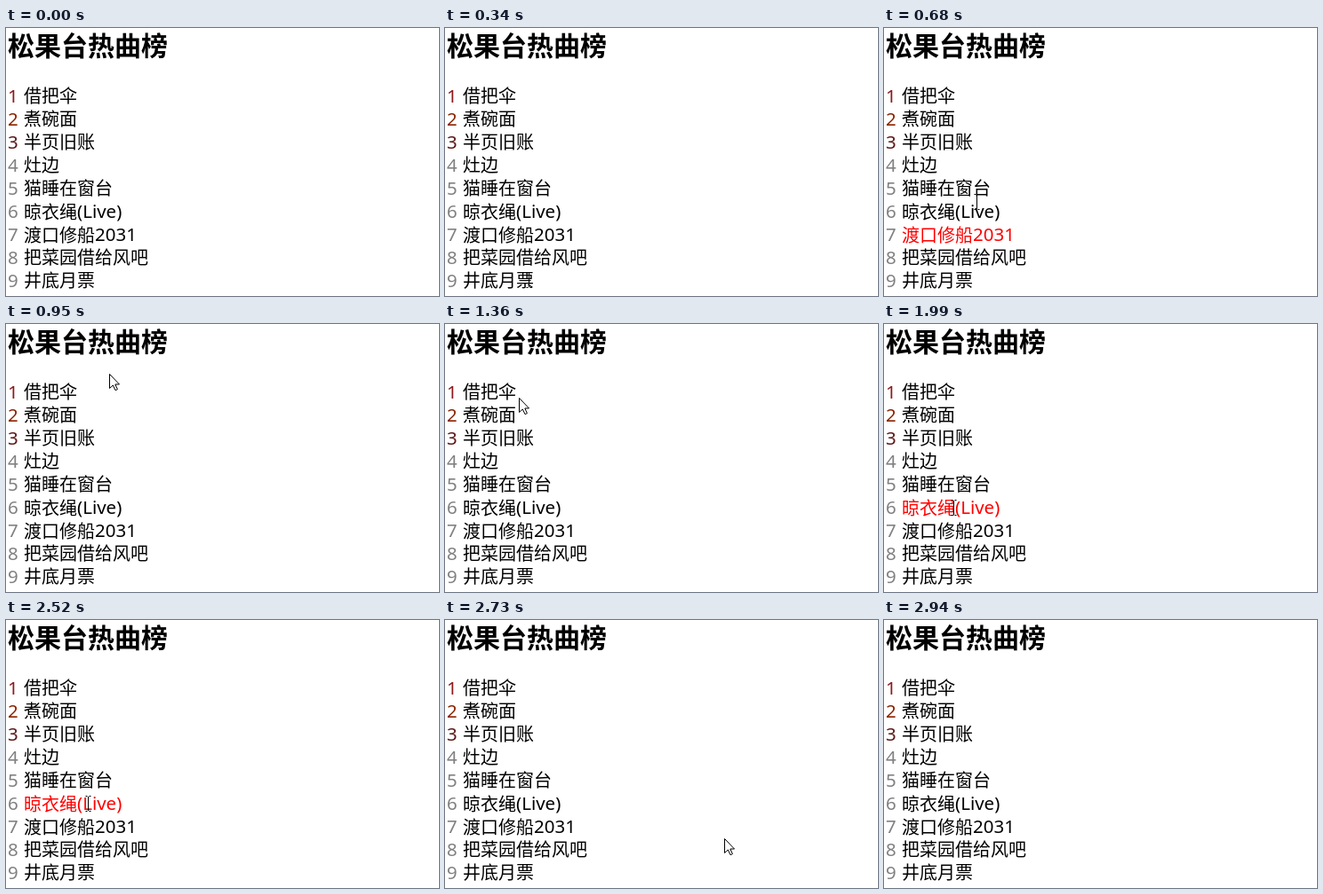
Animation, 487 px wide and 302 px high, one loop 3540 ms. Source, as an HTML page:

```html
<!DOCTYPE html>
<html lang="zh-CN">
<head>
<meta charset="utf-8">
<title>热曲榜</title>
<style>
html, body { margin: 0; width: 100%; height: 100%; overflow: hidden; background: #fff; }
body { position: relative; color: #000; font: 20px/26px "Noto Sans", "Noto Sans CJK SC", sans-serif; }
h1 { position: absolute; left: 2px; top: 0; margin: 0; font-size: 30px; line-height: 40px; white-space: nowrap; }
ol { position: absolute; left: 0; top: 64px; margin: 0; padding: 0; list-style: none; }
li { position: relative; height: 26px; white-space: nowrap; }
b, i { position: relative; top: -1px; font-weight: 400; font-style: normal; font-size: 20.5px; }
b { position: absolute; left: 2px; color: #808080; }
li:nth-child(1) b { color: #8b1a1a; }
li:nth-child(2) b { color: #8b2500; }
li:nth-child(3) b { color: #5c1a18; }
a { position: absolute; left: 20px; }
a.hover { color: #f00; }
svg { position: absolute; left: 0; top: 0; width: 487px; height: 302px; }
</style>
</head>
<body>
<h1>松果台热曲榜</h1>
<ol></ol>
<svg viewBox="0 0 487 302">
  <g id="cursor">
    <path id="arrow" d="M.5.5V16.5L4.3 13 7 18.7 9.4 17.6 6.8 12H11.5Z" fill="#fff" stroke="#000"/>
    <path id="beam" d="M-2.5-8.5H-.5M1.5-8.5H3.5M.5-8V8M-2.5 8.5H-.5M1.5 8.5H3.5" fill="none" stroke="#000"/>
  </g>
</svg>
<script>
const LOOP = 3540, TICK = LOOP / 52;
const LIST_TOP = 64, ROW = 26, TEXT_LEFT = 20;
const songs = ["借把伞", "煮碗面", "半页旧账", "灶边", "猫睡在窗台", "晾衣绳<i>(Live)</i>",
  "渡口修船<i>2031</i>", "把菜园借给风吧", "井底月票"];

// Pointer path: a few points as tick, x, y
const path = [
  [3, 343, 285], [5, 94, 284], [8, 94, 284],                   // enter, rest on the last song
  [10, 104, 196], [11, 109, 132], [14, 116, 56], [18, 116, 19], // up to the heading
  [22, 50, 146], [23, 66, 156], [24, 72, 180], [29, 78, 207],   // back down the list
  [36, 78, 207], [37, 92, 207], [39, 257, 221], [42, 429, 296]  // rest, leave
];

const $ = id => document.getElementById(id);
const show = (el, on) => { el.style.display = on ? "" : "none"; };

document.querySelector("ol").innerHTML =
  songs.map((song, i) => `<li><b>${i + 1}</b><a>${song}</a></li>`).join("");
const links = [...document.querySelectorAll("a")];

function pointerAt(tick) {
  const next = path.findIndex(p => p[0] > tick);
  if (next === 0) return null;
  if (next < 0) return tick === path.at(-1)[0] ? path.at(-1).slice(1) : null;
  const [t0, x0, y0] = path[next - 1], [t1, x1, y1] = path[next];
  const k = (tick - t0) / (t1 - t0);
  return [Math.round(x0 + (x1 - x0) * k), Math.round(y0 + (y1 - y0) * k)];
}

function linkUnder(point) {
  if (!point) return null;
  const [x, y] = point;
  const link = links[Math.floor((y - LIST_TOP) / ROW)];
  return link && x >= TEXT_LEFT && x < TEXT_LEFT + link.offsetWidth ? link : null;
}

function draw() {
  const tick = Math.floor((performance.now() % LOOP + 5) / TICK);
  const point = pointerAt(tick);
  const hovered = linkUnder(pointerAt(tick - 1)); // highlight trails the pointer by one tick
  links.forEach(a => a.classList.toggle("hover", a === hovered));
  show($("cursor"), point);
  if (point) {
    const overText = !!linkUnder(point);
    show($("beam"), overText);
    show($("arrow"), !overText);
    $("cursor").setAttribute("transform", `translate(${point})`);
  }
  requestAnimationFrame(draw);
}
draw();
</script>
</body>
</html>
```
